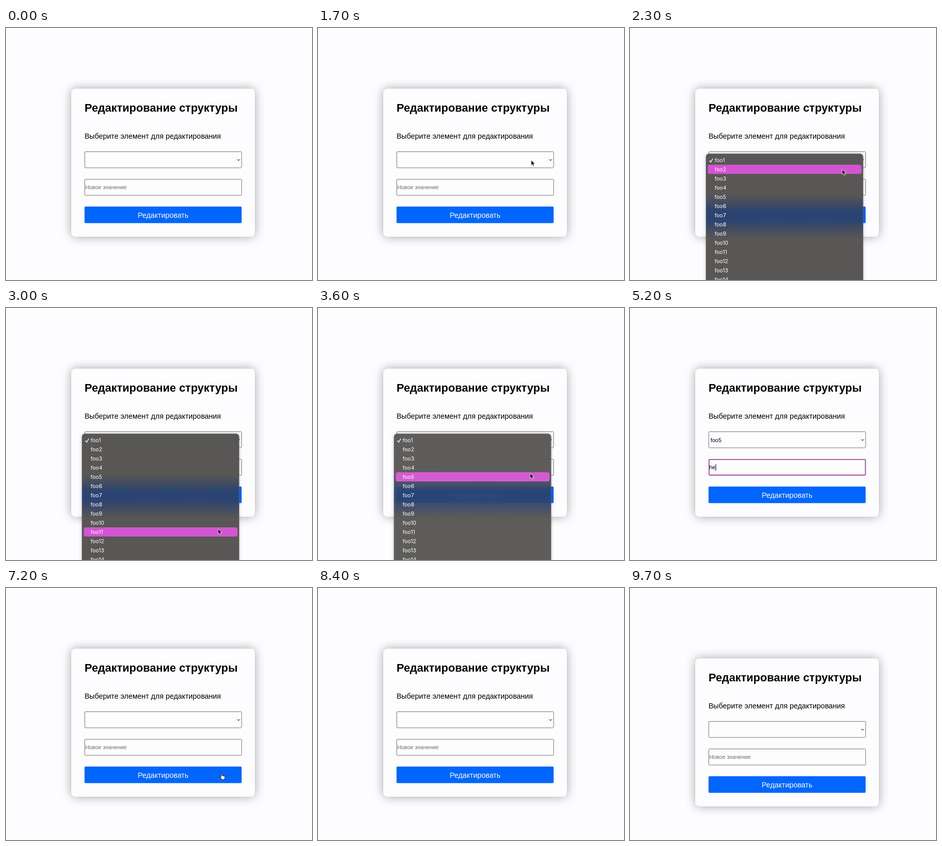
Recreate the animation shown at these times as an HTML page. Size 600 by 494 pixels, loop 9.8 s.

```html
<!DOCTYPE html>
<html lang="ru">
<head>
<meta charset="utf-8">
<title>Редактирование структуры</title>
<style>
  html, body { margin: 0; width: 100%; height: 100%; overflow: hidden; background: #fdfcfe; }
  #form { position: absolute; left: 0; top: 0; width: 600px; height: 494px; }
  #card {
    position: absolute; left: 128px; top: 119px; width: 360px; height: 290px;
    border-radius: 8px; background: #fdfcfe; box-shadow: 0 0 20px rgba(0, 0, 0, .35);
  }
  svg { position: absolute; left: 0; top: 0; width: 600px; height: 494px; overflow: hidden; }
  text { font-family: "Liberation Sans", Arial, sans-serif; white-space: pre; }
  .field { fill: #fdfcfe; stroke: #767676; }
  .small { font-size: 10.9px; }
  .body { font-size: 14.4px; }
  #items text { font: 10.5px Inter, sans-serif; fill: #fff; }
  #shade { filter: blur(3px); }
</style>
</head>
<body>
<div id="form">
  <div id="card"></div>
  <svg viewBox="0 0 600 494">
    <text x="154" y="164" font-size="22" font-weight="700">Редактирование структуры</text>
    <text class="body" x="154" y="217.3">Выберите элемент для редактирования</text>

    <rect class="field" x="154.5" y="242.5" width="307.5" height="31.5" rx="1.5"/>
    <text class="small" id="choice" x="158" y="262.6">foo5</text>
    <path d="M453.2 257.2l2.8 2.8 2.8-2.8" fill="none" stroke="#000"/>

    <rect class="field" x="154.5" y="296.5" width="307.5" height="31.5" rx="1.5"/>
    <rect id="ring" x="155" y="297" width="306.5" height="30.5" rx="2" fill="none" stroke="#ad5cab" stroke-width="1.8"/>
    <text class="small" id="hint" x="155.4" y="316.4" fill="#707070">Новое значение</text>
    <text class="small" id="value" x="155.4" y="316.4"></text>
    <rect id="caret" y="306" width="1" height="13"/>

    <rect x="154" y="350" width="308" height="32.5" rx="2" fill="#06f"/>
    <text class="body" x="308" y="371.5" text-anchor="middle" fill="#fff">Редактировать</text>
  </svg>
</div>

<svg viewBox="0 0 600 494">
  <defs>
    <linearGradient id="glass" gradientUnits="userSpaceOnUse" x1="0" y1="326" x2="0" y2="412">
      <stop offset="0" stop-color="#585756"/>
      <stop offset=".22" stop-color="#414b61"/>
      <stop offset=".38" stop-color="#2b4472"/>
      <stop offset=".58" stop-color="#2b4472"/>
      <stop offset=".78" stop-color="#414b61"/>
      <stop offset="1" stop-color="#585756"/>
    </linearGradient>
  </defs>
  <g id="menu">
    <rect id="shade" x="148" y="246" width="310" height="270" rx="6" opacity=".18"/>
    <rect x="149" y="246.5" width="308" height="270" rx="6" fill="url(#glass)" stroke="#6f6e6e" stroke-width=".6"/>
    <rect id="mark" x="152.5" width="301.5" height="18" rx="4" fill="#d355d2"/>
    <path d="M156 260.2l2.2 2.8 3.8-6.4" fill="none" stroke="#fff" stroke-width="1.4" stroke-linecap="round"/>
    <g id="items"></g>
  </g>
  <g id="pointer">
    <path id="arrow" d="M0 0V10.4L2.4 8.2 4.1 12 5.9 11.2 4.3 7.5H7.5Z" stroke="#fff" stroke-width=".8"/>
    <path id="hand" fill="#fff" stroke="#000" stroke-width=".9" stroke-linejoin="round"
      d="M-1 6V0a1 1 0 0 1 2 0V4a.9.9 0 0 1 1.8 0V4.6a.9.9 0 0 1 1.8 0V5.3a.8.8 0 0 1 1.6.2V8c0 1.6-1 2-1 3.8H.2C-.2 10-2.6 8.4-3 6.6-3.1 5.5-2 5.2-1 6Z"/>
    <path id="beam" d="M-2-7Q0-7 0-5.5Q0-7 2-7M0-5.5V5.5M-2 7Q0 7 0 5.5Q0 7 2 7" fill="none" stroke="#222"/>
  </g>
</svg>

<script>
const LOOP = 9800, STEP = 100, ROW = 18, LIST_TOP = 250;
const $ = id => document.getElementById(id);
const show = (id, on) => { $(id).style.display = on ? "" : "none"; };
const within = (v, from, to) => v >= from && v < to;

// time, x, y of the pointer's hot spot
const path = [
  [400, 471, 438], [1300, 418, 262], [1700, 418, 259], [2200, 417, 264],
  [2300, 416, 277], [2600, 416, 312], [3100, 416, 447], [3500, 416, 324],
  [3600, 416, 324], [4000, 411, 312], [6300, 411, 312], [6600, 423, 364],
  [7800, 423, 364], [8100, 560, 421]
];
const typing = [[5000, "h"], [5200, "he"], [5600, "hel"], [5700, "hell"], [5900, "hello"]];
const FOCUS = 4200, SUBMIT = 6900;

for (let i = 0; i < 14; i++) {
  const item = document.createElementNS("http://www.w3.org/2000/svg", "text");
  item.setAttribute("x", 166);
  item.setAttribute("y", LIST_TOP + ROW * i + 12.8);
  item.textContent = "foo" + (i + 1);
  $("items").append(item);
}

function pointerAt(t) {
  const next = path.findIndex(p => p[0] > t);
  if (next < 1) return (next ? path[path.length - 1] : path[0]).slice(1);
  const [t0, x0, y0] = path[next - 1], [t1, x1, y1] = path[next];
  const k = (t - t0) / (t1 - t0), e = k * k * (3 - 2 * k);
  return [x0 + (x1 - x0) * e, y0 + (y1 - y0) * e];
}

function menuOpacity(t) {
  if (!within(t, 1800, 3800)) return 0;
  return t < 3600 ? 1 : t < 3700 ? .96 : .4;
}

function drawMenu(t, y) {
  const alpha = menuOpacity(t);
  show("menu", alpha > 0);
  $("menu").setAttribute("opacity", alpha);
  const row = t < 3600 ? Math.floor((y - LIST_TOP) / ROW) : 4;
  $("mark").setAttribute("y", LIST_TOP + ROW * row);
}

function drawPointer(t, x, y) {
  const overForm = !menuOpacity(t) && within(x, 154, 462);
  const hand = overForm && within(y, 350, 383);
  const beam = overForm && within(y, 296, 329);
  show("pointer", within(t, 400, 5000) || within(t, 6300, 8200));
  show("hand", hand);
  show("beam", beam);
  show("arrow", !hand && !beam);
  $("pointer").setAttribute("transform", `translate(${x} ${y})`);
}

function drawForm(t) {
  const focused = within(t, FOCUS, SUBMIT);
  const typed = typing.filter(k => k[0] <= t).pop();
  const value = focused && typed ? typed[1] : "";
  const since = t - (typed ? typed[0] : FOCUS);
  show("choice", within(t, 3700, SUBMIT));
  show("ring", focused);
  show("hint", !value);
  $("value").textContent = value;
  show("caret", focused && since % 1000 < 500);
  $("caret").setAttribute("x", 155.6 + (value ? $("value").getComputedTextLength() : 0));
  $("form").style.top = t >= 8800 ? "19px" : "0";
}

function draw() {
  const t = Math.floor(performance.now() % LOOP / STEP) * STEP;
  const [x, y] = pointerAt(t);
  drawForm(t);
  drawMenu(t, y);
  drawPointer(t, x, y);
  requestAnimationFrame(draw);
}
draw();
</script>
</body>
</html>
```
